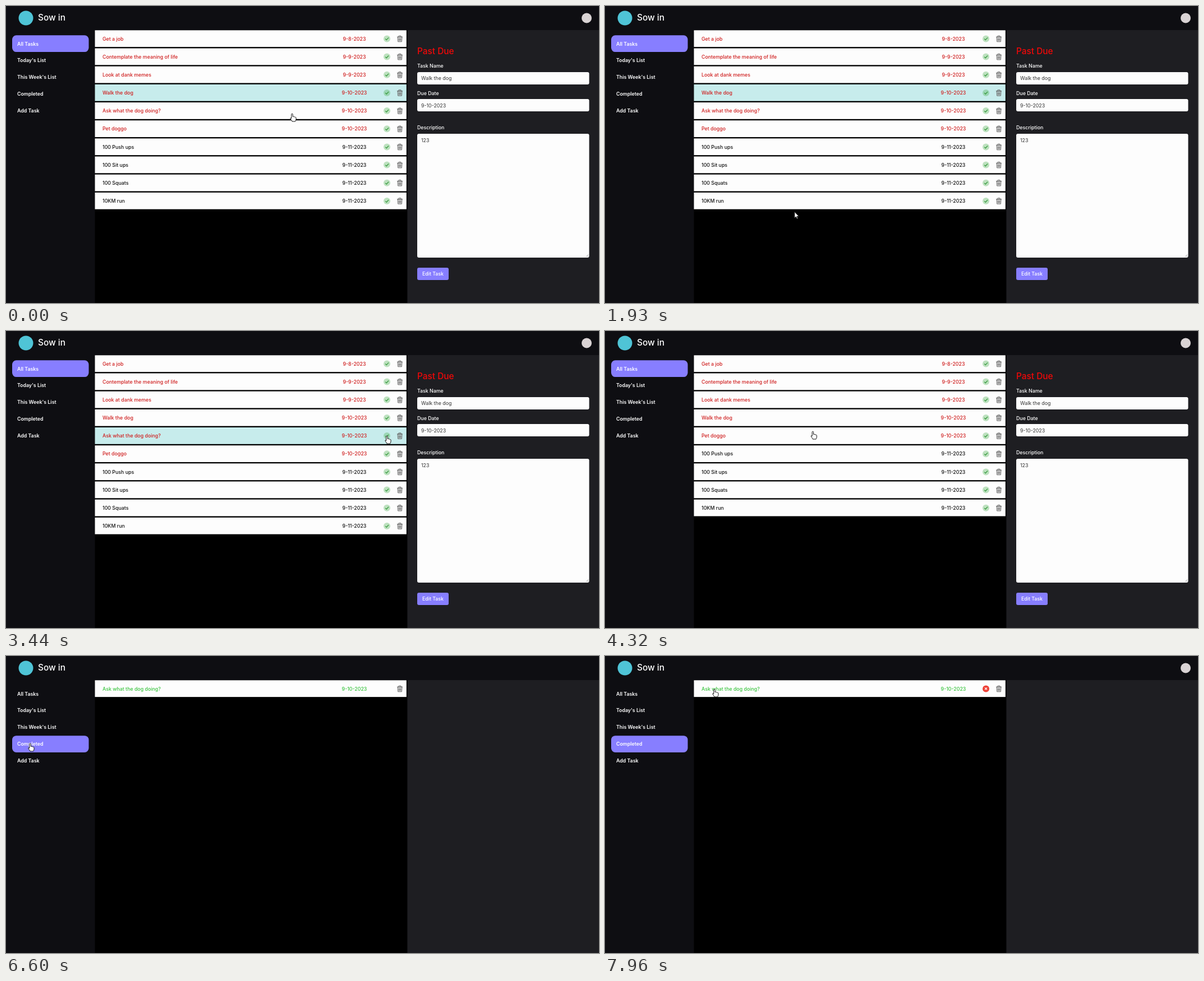
An HTML page for the animation above (8000 ms loop, 1057 px wide and 530 px high).

```html
<!DOCTYPE html>
<html lang="en">
<head>
<meta charset="utf-8">
<title>Task list</title>
<style>
html, body { margin: 0; width: 100%; height: 100%; overflow: hidden; background: #000; }
svg { display: block; width: 100vw; height: 100vh; }
text { font: 500 8.8px Inter, Roboto, sans-serif; fill: #fff; white-space: pre; }
text.title { font-size: 15.4px; }
text.nav { font-weight: 600; }
text.field { font-weight: 400; fill: #333; }
</style>
</head>
<body>
<svg id="stage" viewBox="0 0 1057 530" xmlns="http://www.w3.org/2000/svg">
  <defs>
    <g id="check">
      <circle r="6" fill="#4caf50" fill-opacity=".36"/>
      <path d="M-2.8 .2L-.8 2.2L3-2" fill="none" stroke="#3f9f46" stroke-width="1.4"/>
    </g>
    <g id="undo">
      <circle r="6" fill="#ee4036"/>
      <path d="M-2-2L2 2M2-2L-2 2" stroke="#fff" stroke-width="1.3"/>
    </g>
    <g id="trash" fill="none" stroke="#5c5c5c" stroke-width=".9">
      <path d="M-4-2.8L-3.3 5.3H3.3L4-2.8Z" fill="#bbb" fill-opacity=".35"/>
      <path d="M-5-3.3H5M-2-3.5V-5.2H2V-3.5M-1.8-1L-1.5 3.8M0-1V3.8M1.8-1L1.5 3.8"/>
    </g>
  </defs>
  <rect width="1057" height="530" fill="#0e0e12"/>
  <rect x="158.5" y="43" width="557" height="487" fill="#000"/>
  <rect x="715.5" y="43" width="341.5" height="487" fill="#1e1e22"/>
  <circle cx="35.5" cy="21.5" r="13" fill="#4fc4d6"/>
  <text class="title" x="57" y="26.4">Sow in</text>
  <circle id="avatar" cx="1035" cy="21.5" r="9" fill="#d9d3d4"/>
  <g id="nav"></g>
  <g id="list"></g>
  <g id="panel">
    <text class="title" x="733" y="86" style="fill:#f00808">Past Due</text>
    <text x="733" y="110.2">Task Name</text>
    <text x="733" y="158.6">Due Date</text>
    <text x="733" y="220.2">Description</text>
    <g fill="#fdfdfd">
      <rect x="733" y="118" width="306.5" height="22" rx="3"/>
      <rect x="733" y="166" width="306.5" height="22" rx="3"/>
      <rect x="733" y="228" width="306.5" height="221" rx="3"/>
    </g>
    <path d="M1034 447.5L1038 443.5M1036.5 447.5L1038 446" stroke="#777" stroke-width=".7"/>
    <text class="field" x="740" y="132.2">Walk the dog</text>
    <text class="field" x="740" y="180.6">9-10-2023</text>
    <text class="field" x="740" y="242.8">123</text>
    <rect x="733" y="467" width="56" height="22" rx="3" fill="#877eff"/>
    <text x="761" y="481.2" text-anchor="middle">Edit Task</text>
  </g>
  <g id="cursor" fill="#fff" stroke="#111" stroke-width="1" stroke-linejoin="round">
    <path id="hand" d="M-3.2 1.6V-5.6a1.2 1.2 0 0 1 2.4 0V-1.6q1.9-.7 2.2.4q1.6-.4 2 .6q1.5-.2 1.6 1V3q0 2-1.2 3.4V7H-2.2V6.2Q-4.6 3.6-5.2 1.2q.8-1.2 2 .4Z"/>
    <path id="arrow" d="M-2-7V4.2L.6 1.8L2.2 5.6L3.9 4.9L2.3 1.2H5.8Z"/>
  </g>
</svg>
<script>
const LOOP = 8000, TOP = 43.3, PITCH = 32.17, ROW_H = 29.8;
const RED = '#cf1d1d', BLACK = '#111', GREEN = '#3ac43f';
const $ = id => document.getElementById(id);

const tasks = [
  ['Get a job', '9-8-2023', RED],
  ['Contemplate the meaning of life', '9-9-2023', RED],
  ['Look at dank memes', '9-9-2023', RED],
  ['Walk the dog', '9-10-2023', RED],
  ['Ask what the dog doing?', '9-10-2023', RED],
  ['Pet doggo', '9-10-2023', RED],
  ...['100 Push ups', '100 Sit ups', '100 Squats', '10KM run'].map(name => [name, '9-11-2023', BLACK])
];
const open = tasks.filter((_, i) => i !== 4);
const done = [['Ask what the dog doing?', '9-10-2023', GREEN]];
const navItems = ['All Tasks', "Today's List", "This Week's List", 'Completed', 'Add Task'];

// Page states, each holding from its start time.
const scenes = [
  { at: 0, rows: tasks, focus: 3, tab: 0, icon: 'check', avatar: true },
  { at: 3400, rows: tasks, focus: 4, tab: 0, icon: 'check', avatar: true },
  { at: 3720, rows: open, focus: -1, tab: 0, icon: 'check', avatar: true },
  { at: 6600, rows: done, focus: -1, tab: 3, icon: '', avatar: false },
  { at: 6640, rows: done, focus: -1, tab: 3, icon: 'undo', avatar: true }
];

// Pointer stops: time, x, y.
const stops = [
  [0, 512, 199], [420, 530, 240], [830, 475, 193], [1230, 401, 309], [1630, 236, 486],
  [2050, 390, 320], [2460, 508, 190], [2580, 500, 189], [3170, 681, 194],
  [3720, 681, 194], [4320, 373, 186], [4530, 214, 187], [5240, 45, 163],
  [6600, 45, 163], [7410, 233, 98], [7960, 197, 66], [LOOP, 197, 66]
];

function slope(i, k) {
  const a = stops[i - 1], b = stops[i], c = stops[i + 1];
  if (!a || !c) return 0;
  // Stand still at pauses and at turning points.
  if ((b[k] - a[k]) * (c[k] - b[k]) <= 0) return 0;
  return (c[k] - a[k]) / (c[0] - a[0]);
}

function pointer(t) {
  let i = 0;
  while (i < stops.length - 2 && t >= stops[i + 1][0]) i++;
  const a = stops[i], b = stops[i + 1], d = b[0] - a[0], u = (t - a[0]) / d;
  return [1, 2].map(k => {
    const s = u * u * (3 - 2 * u);
    return a[k] + (b[k] - a[k]) * s +
      d * u * (1 - u) * ((1 - u) * slope(i, k) - u * slope(i + 1, k));
  });
}

function rowMarkup([name, date, color], i, { focus, icon }) {
  const y = TOP + PITCH * i, mid = y + 15.1, base = mid + 3.2;
  const fill = i === focus ? '#c7ecec' : '#fdfdfd';
  return `<rect x="158.5" y="${y}" width="555.3" height="${ROW_H}" fill="${fill}"/>
    <text x="172" y="${base}" style="fill:${color}">${name}</text>
    <text x="621" y="${base}" text-anchor="middle" style="fill:${color}">${date}</text>
    ${icon && `<use href="#${icon}" x="679" y="${mid}"/>`}
    <use href="#trash" x="702" y="${mid}"/>`;
}

function showScene(scene) {
  $('nav').innerHTML =
    `<rect x="11" y="${52.3 + 29.95 * scene.tab}" width="136.5" height="29.8" rx="7.5" fill="#877eff"/>` +
    navItems.map((s, i) => `<text class="nav" x="20" y="${70.5 + 29.95 * i}">${s}</text>`).join('');
  $('list').innerHTML = scene.rows.map((row, i) => rowMarkup(row, i, scene)).join('');
  $('avatar').style.display = scene.avatar ? '' : 'none';
  $('panel').style.display = scene.tab === 0 ? '' : 'none';
}

function clickable(x, y, scene) {
  if (x < 158) return x > 11 && x < 147.5 && y > 52 && y < 202;
  return x < 714 && y > TOP && y < TOP + PITCH * scene.rows.length;
}

let shown = null;
function draw(t) {
  const scene = scenes.filter(s => t >= s.at).pop();
  if (scene !== shown) showScene(shown = scene);
  const [x, y] = pointer(t);
  const overLink = clickable(x - 2, y - 7, scene);
  $('cursor').setAttribute('transform', `translate(${x} ${y})`);
  $('hand').style.display = overLink ? '' : 'none';
  $('arrow').style.display = overLink ? 'none' : '';
}

const start = performance.now();
function tick() {
  draw((performance.now() - start) % LOOP);
  requestAnimationFrame(tick);
}
tick();
</script>
</body>
</html>
```
